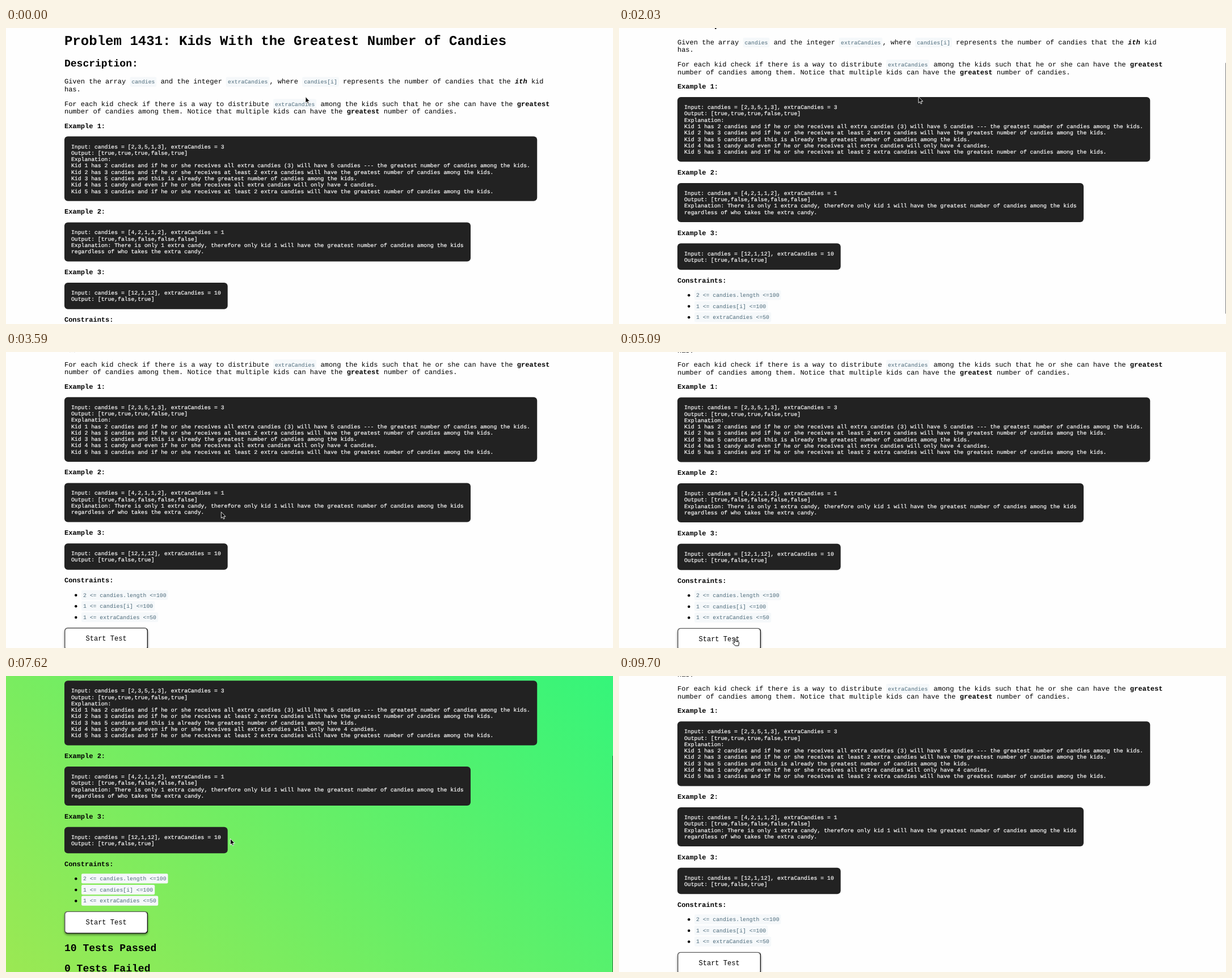
An HTML page for the animation above (10000 ms loop, 1070x523 px).

```html
<!DOCTYPE html>
<html lang="en">
<head>
<meta charset="utf-8">
<title>Coding problem page</title>
<style>
  html, body { margin: 0; width: 100%; height: 100%; overflow: hidden; }
  body { position: relative; background: #fefefe; color: #000; }
  body.passed { background: linear-gradient(45deg, #9be853, #35f57a); }

  #page {
    position: absolute; left: 0; top: 0; width: 1424px; height: 990px;
    transform-origin: 0 0;
    font: 16px/18px "Liberation Mono", monospace;
    text-rendering: geometricPrecision;
    white-space: nowrap;
  }
  #page > * { position: absolute; left: 137px; margin: 0; box-sizing: border-box; }
  h1 { font-size: 32px; line-height: 37px; }
  h2 { font-size: 24px; line-height: 28px; }
  code {
    font: 13px/1 "Liberation Mono", monospace;
    padding: 5px 4px 3px; border-radius: 3px;
    background: #f5f8fa; color: #4d6b7b;
  }
  pre {
    font: 13px/15px "Liberation Mono", monospace;
    padding: 17px 16px 15px; border-radius: 8px;
    background: #222; color: #fff;
    -webkit-text-stroke: .25px #fff;
  }
  ul { padding: 0; list-style: none; }
  li { position: relative; height: 18px; margin-bottom: 8px; padding-left: 40px; }
  li::before {
    content: ""; position: absolute; left: 24px; top: 6px;
    width: 6px; height: 6px; border-radius: 50%; background: #000;
  }
  button {
    width: 196px; height: 53px; padding: 0;
    font: inherit; color: #000; background: #fff;
    border: 2px solid; border-color: #5a5a5a #111 #111 #5a5a5a;
    border-radius: 8px; box-shadow: 0 3px 5px rgba(0, 0, 0, .45);
  }
  button.pressed { border-color: #111 #5a5a5a #5a5a5a #111; }

  #thumb { position: absolute; right: 0; top: 0; width: 1.5px; background: rgba(0, 0, 0, .5); }
  #cursor { position: absolute; left: 0; top: 0; width: 16px; height: 18px; overflow: visible; }
</style>
</head>
<body>
<main id="page">
  <h1 style="top:12.6px">Problem 1431: Kids With the Greatest Number of Candies</h1>
  <h2 style="top:70.5px">Description:</h2>
  <p style="top:118px">Given the array <code>candies</code> and the integer <code>extraCandies</code>, where <code>candies[i]</code> represents the number of candies that the <b><i>ith</i></b> kid<br>has.</p>
  <p style="top:170px">For each kid check if there is a way to distribute <code>extraCandies</code> among the kids such that he or she can have the <b>greatest</b><br>number of candies among them. Notice that multiple kids can have the <b>greatest</b> number of candies.</p>

  <b style="top:222px">Example 1:</b>
  <pre style="top:255px">Input: candies = [2,3,5,1,3], extraCandies = 3
Output: [true,true,true,false,true]
Explanation:
Kid 1 has 2 candies and if he or she receives all extra candies (3) will have 5 candies --- the greatest number of candies among the kids.
Kid 2 has 3 candies and if he or she receives at least 2 extra candies will have the greatest number of candies among the kids.
Kid 3 has 5 candies and this is already the greatest number of candies among the kids.
Kid 4 has 1 candy and even if he or she receives all extra candies will only have 4 candies.
Kid 5 has 3 candies and if he or she receives at least 2 extra candies will have the greatest number of candies among the kids.</pre>

  <b style="top:424px">Example 2:</b>
  <pre style="top:457px">Input: candies = [4,2,1,1,2], extraCandies = 1
Output: [true,false,false,false,false]
Explanation: There is only 1 extra candy, therefore only kid 1 will have the greatest number of candies among the kids
regardless of who takes the extra candy.</pre>

  <b style="top:566px">Example 3:</b>
  <pre style="top:599px">Input: candies = [12,1,12], extraCandies = 10
Output: [true,false,true]</pre>

  <b style="top:678px">Constraints:</b>
  <ul style="top:712px">
    <li><code>2 &lt;= candies.length &lt;=100</code></li>
    <li><code>1 &lt;= candies[i] &lt;=100</code></li>
    <li><code>1 &lt;= extraCandies &lt;=50</code></li>
  </ul>
  <button id="start" style="top:797px">Start Test</button>
  <h2 style="top:871.5px">10 Tests Passed</h2>
  <h2 style="top:919.5px">0 Tests Failed</h2>
</main>

<div id="thumb"></div>
<svg id="cursor" stroke-linejoin="round">
  <path id="arrow" fill="#000" stroke="#fff" stroke-width=".9"
    d="M0 0V11L2.5 8.7 4.1 12.5 5.9 11.7 4.3 8.1H7.7Z"/>
  <path id="hand" fill="#fff" stroke="#000" stroke-width="1"
    d="M2.4 8V1.4a1.1 1.1 0 0 1 2.2 0V5.2l5 1q1.2.3 1 1.7L9.8 13H4.2L-.6 8.5Q-.2 6.3 2.4 8Z"/>
</svg>

<script>
const LOOP = 10000, SCALE = 0.7514;
const el = id => document.getElementById(id);

// Screen refreshes as [first, last, count]; the picture holds between them.
const refreshes = [
  [1290, 1530, 3], [1680, 2150, 5], [2300, 2300, 1], [2450, 2450, 1], [2600, 2710, 2],
  [2825, 2940, 2], [3180, 4120, 11], [4210, 4470, 4], [4920, 4920, 1], [5090, 5480, 5],
  [6640, 6850, 3], [7000, 7120, 2], [7470, 7470, 1], [7620, 7620, 1], [7770, 7770, 1],
  [8130, 8130, 1], [8970, 9170, 3], [9340, 9700, 5]
];
const ticks = [0];
for (const [first, last, count] of refreshes)
  for (let i = 0; i < count; i++)
    ticks.push(Math.floor(first + (last - first) * i / Math.max(1, count - 1)));

const scrollKeys = [
  [0, 0], [1200, 0], [1410, 10], [1530, 24], [1680, 40], [2150, 99], [2300, 101],
  [2450, 106], [2710, 112.3], [3180, 112.3], [4120, 111.4], [6530, 111.4],
  [6640, 115.4], [6850, 164.5], [7000, 180], [7120, 184], [7470, 184.2],
  [7620, 183.4], [7770, 112.3], [8130, 111.4], [LOOP, 111.4]
];
const cursorKeys = [
  [0, 528, 121.5], [3086, 528, 121.5], [4120, 201, 476], [4470, 201, 506],
  [5090, 201, 506], [5480, 395.5, 287.5], [8870, 395.5, 287.5],
  [9170, 834, 446], [9250, 834, 446], [9700, 1076, 526], [LOOP, 1076, 526]
];

function sample(keys, t) {
  const next = Math.max(1, keys.findIndex(key => key[0] > t));
  const [t0, ...from] = keys[next - 1], [t1, ...to] = keys[next];
  return from.map((v, i) => v + (to[i] - v) * (t - t0) / (t1 - t0));
}

const between = (t, start, end) => t >= start && t < end;

function draw(time) {
  const t = ticks.findLast(tick => tick <= time);
  const [scroll] = sample(scrollKeys, t);
  const [x, y] = sample(cursorKeys, t);
  const passed = between(t, 5180, 7770);
  const onButton = between(t, 4200, 5180) && y > 486;

  document.body.classList.toggle("passed", passed);
  el("page").style.transform = `translateY(${-scroll}px) scale(${SCALE})`;
  el("start").classList.toggle("pressed", between(t, 4920, 5090));

  const ratio = passed ? 0.747 : 0.83;
  const thumb = el("thumb").style;
  thumb.display = between(t, 1290, 3400) || between(t, 6700, 7770) ? "block" : "none";
  thumb.transform = `translateY(${4 + scroll * ratio}px)`;
  thumb.height = `${(passed ? 391 : 443)}px`;

  el("cursor").style.transform = `translate(${x}px, ${y}px)`;
  el("arrow").style.display = onButton ? "none" : "";
  el("hand").style.display = onButton ? "" : "none";
}

const began = performance.now();
function frame() {
  draw((performance.now() - began) % LOOP);
  requestAnimationFrame(frame);
}
frame();
</script>
</body>
</html>
```
